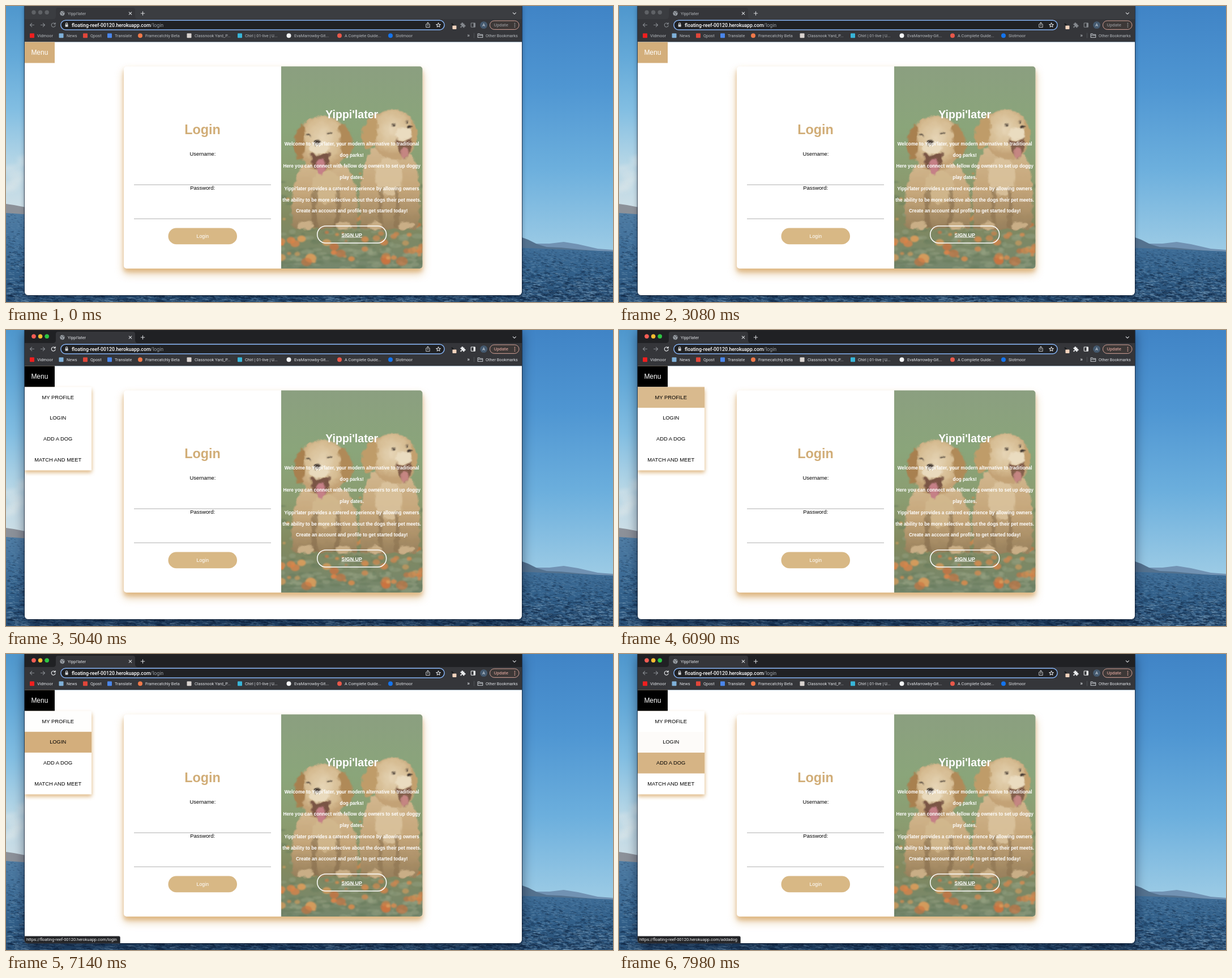
An HTML page with a canvas for the animation above (8000 ms loop, 1072x522 px).

```html
<!DOCTYPE html>
<html lang="en">
<head>
<meta charset="utf-8">
<title>Login page</title>
<style>
html, body { margin: 0; width: 100%; height: 100%; overflow: hidden; background: #4a8fcb; }
canvas, svg { position: absolute; left: 0; top: 0; width: 1072px; height: 522px; }
.shadow { position: absolute; left: 33px; top: -6px; width: 878px; height: 516px; border-radius: 7px;
  animation: shadow 8s step-end infinite; }
text { font-family: Roboto, Inter, sans-serif; }
.page text { font-family: "Liberation Sans", Arial, sans-serif; text-anchor: middle; }
.page .b { font-weight: bold; }
.ui { font-size: 7.35px; }
.line { fill: none; stroke: currentColor; stroke-width: 1.1; stroke-linecap: round; stroke-linejoin: round; }
.strip { animation: strip 8s step-end infinite; }
.icons { animation: icons 8s step-end infinite; }
.label { animation: label 8s step-end infinite; }
.update { animation: update 8s step-end infinite; }
.lights { animation: reveal-lights 8s step-end infinite; }
.menu { animation: reveal-menu 8s step-end infinite; }
.profile { animation: profile 8s infinite; }
.login { animation: login 8s infinite; }
.add { animation: add 8s infinite; }
.url1 { animation: url1 8s linear infinite; }
.url2 { animation: url2 8s step-end infinite; }

@keyframes shadow {
  0% { box-shadow: 0 4px 9px rgba(0,10,30,.36), 0 0 1px 1px rgba(20,30,45,.7); }
  56.875% { box-shadow: 0 7px 15px rgba(0,10,30,.45), 0 0 1px 1px rgba(20,30,45,.7); }
  57.75%, 100% { box-shadow: 0 9px 20px rgba(0,10,30,.52), 0 0 1px 1px rgba(20,30,45,.7); }
}
@keyframes strip { 0% { fill: #3b3d41; } 57.75%, 100% { fill: #202124; } }
@keyframes icons { 0% { color: #85898e; } 57.75%, 100% { color: #eceef0; } }
@keyframes label { 0% { fill: #b4b8bc; } 57.75%, 100% { fill: #dfe1e5; } }
@keyframes update { 0% { color: #a0a3a7; } 57.75%, 100% { color: #f0b2a8; } }
@keyframes reveal-lights { 0% { opacity: 0; } 56.875%, 100% { opacity: 1; } }
@keyframes reveal-menu { 0% { opacity: 0; } 63%, 100% { opacity: 1; } }
@keyframes profile {
  0%, 71.25% { opacity: 0; animation-timing-function: ease; }
  80%, 81.375% { opacity: 1; animation-timing-function: ease; }
  90.125%, 100% { opacity: 0; }
}
@keyframes login {
  0%, 81.375% { opacity: 0; animation-timing-function: ease; }
  90.125%, 93.125% { opacity: 1; animation-timing-function: ease; }
  100% { opacity: .04; }
}
@keyframes add {
  0%, 93.125% { opacity: 0; animation-timing-function: ease; }
  100% { opacity: .92; }
}
@keyframes url1 {
  0%, 83.1% { opacity: 0; }
  84.9%, 94.49% { opacity: 1; }
  94.5%, 100% { opacity: 0; }
}
@keyframes url2 { 0% { opacity: 0; } 94.5%, 100% { opacity: 1; } }
</style>
</head>
<body>
<canvas id="sea" width="1072" height="522"></canvas>
<div class="shadow"></div>
<svg viewBox="0 0 1072 522">
  <defs>
    <clipPath id="win"><rect x="33" y="-8" width="878" height="518" rx="6"/></clipPath>
    <clipPath id="half"><path d="M486 106.5H730.5a5 5 0 0 1 5 5V458a5 5 0 0 1-5 5H486Z"/></clipPath>
    <linearGradient id="meadow" x2="0" y2="1">
      <stop offset="0" stop-color="#8b9f80"/><stop offset=".3" stop-color="#8aa57a"/>
      <stop offset=".55" stop-color="#8b9c70"/><stop offset=".75" stop-color="#82895f"/>
      <stop offset="1" stop-color="#75876d"/>
    </linearGradient>
    <linearGradient id="fur" x2="0" y2="1">
      <stop offset="0" stop-color="#d2b78f"/><stop offset=".5" stop-color="#c5a67a"/><stop offset="1" stop-color="#98805c"/>
    </linearGradient>
    <radialGradient id="face" cy=".4">
      <stop offset="0" stop-color="#e6d5b6"/><stop offset=".7" stop-color="#d6bc92"/><stop offset="1" stop-color="#c3a276"/>
    </radialGradient>
    <filter id="soft" x="-10%" y="-10%" width="120%" height="120%"><feGaussianBlur stdDeviation="1.2"/></filter>
    <filter id="fluffy" x="-10%" y="-10%" width="120%" height="120%">
      <feGaussianBlur stdDeviation="1.3" result="blur"/>
      <feTurbulence type="fractalNoise" baseFrequency=".09" numOctaves="2" seed="4"/>
      <feDisplacementMap in="blur" scale="9" xChannelSelector="R" yChannelSelector="G"/>
    </filter>
    <filter id="glow1" x="-20%" y="-20%" width="140%" height="140%"><feGaussianBlur stdDeviation="8"/></filter>
    <filter id="glow2" x="-20%" y="-20%" width="140%" height="140%"><feGaussianBlur stdDeviation="3.5"/></filter>
  </defs>

  <g clip-path="url(#win)">
    <rect x="33" y="-8" width="878" height="40" class="strip"/>
    <path d="M83 23q5 0 5-5V7q0-4 4-4H224q4 0 4 4V18q0 5 5 5H911V63.5H33V23Z" fill="#35363a"/>
    <rect x="33" y="63.5" width="878" height="447" fill="#fff"/>
  </g>

  <g fill="#5f6266"><circle cx="49" cy="11.3" r="3.7"/><circle cx="60.6" cy="11.3" r="3.7"/><circle cx="72.2" cy="11.3" r="3.7"/></g>
  <g class="lights">
    <circle cx="49" cy="11.3" r="3.7" fill="#fb5b52"/><circle cx="60.6" cy="11.3" r="3.7" fill="#fdbc2e"/><circle cx="72.2" cy="11.3" r="3.7" fill="#2bc840"/>
  </g>

  <g class="ui">
    <circle cx="99.5" cy="13" r="4.2" fill="#9aa0a6"/>
    <path d="M96.5 11.5l2.5 1 1 2-1.5 2M100 9.3l1 2 2 .5" fill="none" stroke="#45474b" stroke-width="1"/>
    <text x="109" y="15.6" class="label">Yippi'later</text>
    <g class="line" color="#d5d7da"><path d="M217.3 10.8l4.4 4.4m0-4.4l-4.4 4.4M238.3 13h6.4M241.5 9.8v6.4M895.3 11.8l2.6 2.6 2.6-2.6"/></g>

    <rect x="96.8" y="25.3" width="677.4" height="16.6" rx="8.3" fill="#202124" stroke="#85b2f2" stroke-width="1.5"/>
    <rect x="104.6" y="32.4" width="5" height="4.3" rx=".6" fill="#d0d3d6"/>
    <path d="M105.6 32.5v-1.3a1.5 1.5 0 0 1 3 0v1.3" class="line" color="#d0d3d6" stroke-width=".9"/>
    <text x="116" y="36.7" font-size="8.75" font-weight="500" fill="#fff">floating-reef-00120.herokuapp.com<tspan font-weight="400" fill="#9aa0a6">/login</tspan></text>
    <g class="line" color="#d5d7da">
      <path d="M743.2 32h-1.4v5.6h6.4V32h-1.4M745 35v-6m-1.8 1.7l1.8-1.8 1.8 1.8" stroke-width=".9"/>
      <path id="star" d=""/>
    </g>
    <g class="line" color="#84888d"><path d="M49.5 33.5h-7m3.2-3.2l-3.2 3.2 3.2 3.2M61.5 33.5h7m-3.2-3.2l3.2 3.2-3.2 3.2"/></g>
    <g class="icons">
      <path d="M86.4 31.3a3.5 3.5 0 1 0 .7 3.2M87.2 29.6v2.3h-2.4" class="line"/>
      <path d="M802.5 31.3h2a1.5 1.5 0 1 1 2.8 0h2.2v2.3a1.5 1.5 0 1 1 0 2.7v1.9h-2.4a1.4 1.4 0 1 0-2.5 0h-2.1v-2.3a1.4 1.4 0 1 0 0-2.5Z" fill="currentColor"/>
      <rect x="821.3" y="30" width="7.2" height="7.2" rx=".7" class="line"/>
      <rect x="825.6" y="30" width="2.9" height="7.2" fill="currentColor"/>
    </g>
    <path d="M787 31l4 4" stroke="#17181a" stroke-width="2.2"/>
    <rect x="788.5" y="34.5" width="7" height="6.5" rx="1" fill="#f3d3bd"/>
    <circle cx="843.7" cy="33.6" r="6.4" fill="#455a70"/>
    <text x="843.7" y="36.2" text-anchor="middle" fill="#e6ebf0">A</text>
    <g class="update">
      <rect x="854.5" y="26" width="51.5" height="15.4" rx="7.7" fill="#3d3837" stroke="#d3a196"/>
      <text x="861.8" y="36.3" font-size="7.9" fill="currentColor">Update</text>
      <g fill="currentColor"><circle cx="898.5" cy="30.6" r=".9"/><circle cx="898.5" cy="33.7" r=".9"/><circle cx="898.5" cy="36.8" r=".9"/></g>
    </g>

    <g id="marks"></g>
    <text x="814.5" y="54.6" font-size="9" font-weight="bold" class="label">»</text>
    <path d="M826.7 47.5v9" stroke="#5f6368" stroke-width=".7"/>
    <path d="M833.2 55.5v-6.4h3l1 1.2h4.6v5.2ZM833.2 52h8.6" class="line" color="#bdc1c6"/>
    <text x="847" y="54.7" class="label">Other Bookmarks</text>
  </g>

  <g class="page">
    <rect x="33" y="63.5" width="53" height="37" fill="#d3ae7b"/>
    <text x="59.4" y="86" font-size="12" fill="#fff">Menu</text>

    <rect x="208" y="115" width="527.5" height="357" rx="5" fill="#d9b27c" opacity=".65" filter="url(#glow1)"/>
    <rect x="208" y="112" width="527.5" height="357" rx="5" fill="#d9a766" opacity=".6" filter="url(#glow2)"/>
    <rect x="208" y="106.5" width="527.5" height="356.5" rx="5" fill="#fff"/>
    <text class="b" x="347" y="225.5" font-size="23.4" fill="#d1ad77">Login</text>
    <text x="347.4" y="264" font-size="9.4">Username:</text>
    <text x="347.2" y="324" font-size="9.4">Password:</text>
    <path d="M226 315.2H468M226 375.2H468" stroke="#b0b0b0" stroke-width="1.1"/>
    <rect x="286.5" y="391.5" width="121.5" height="28.8" rx="14.4" fill="#d8b885"/>
    <text x="347.3" y="409" font-size="8.8" fill="#fff">Login</text>

    <g clip-path="url(#half)">
      <rect x="486" y="106" width="250" height="358" fill="url(#meadow)"/>
      <g id="flowers" filter="url(#soft)"></g>
      <g filter="url(#fluffy)">
        <!-- right puppy -->
        <path d="M626 394Q618 300 645 252Q700 238 722 270Q738 335 727 394Z" fill="url(#fur)"/>
        <ellipse cx="676" cy="300" rx="24" ry="34" fill="#dcc6a0" opacity=".8"/>
        <path d="M640 205Q652 182 686 183Q716 186 723 212Q728 236 714 262Q690 278 662 262Q640 240 640 205Z" fill="url(#face)"/>
        <path d="M648 194Q628 208 629 236Q633 254 644 252Q658 230 656 202Z" fill="#bf9c69"/>
        <path d="M717 202Q728 218 725 244Q720 252 715 240Z" fill="#c3a06e"/>
        <path d="M688 234Q704 242 716 232Q718 258 706 270Q692 266 688 234Z" fill="#835e4c"/>
        <ellipse cx="704" cy="259" rx="7" ry="10" fill="#c58682"/>
        <ellipse cx="703" cy="226" rx="15" ry="10" fill="#eadcc0"/>
        <ellipse cx="712" cy="214" rx="5" ry="3.6" fill="#4c4039"/>
        <circle cx="685" cy="210" r="2.8" fill="#4c4039"/><circle cx="708" cy="203" r="2.2" fill="#4c4039"/>
        <path d="M664 320Q658 356 664 392M690 320Q694 356 688 392" fill="none" stroke="#8a7250" stroke-width="7" opacity=".6"/>
        <!-- left puppy -->
        <path d="M506 392Q498 322 524 280Q565 262 604 284Q628 335 619 392Z" fill="url(#fur)"/>
        <ellipse cx="566" cy="318" rx="26" ry="30" fill="#d3b98f" opacity=".8"/>
        <path d="M515 232Q520 196 558 194Q596 196 604 228Q606 262 584 284Q560 300 534 284Q516 264 515 232Z" fill="url(#face)"/>
        <path d="M524 208Q506 222 509 256Q514 276 524 270Q530 240 528 212Z" fill="#a8804f"/>
        <path d="M594 206Q614 220 612 250Q608 268 596 268Q588 238 588 212Z" fill="#b08a58"/>
        <path d="M538 258Q554 266 572 258Q572 286 556 298Q540 288 538 258Z" fill="#7a5545"/>
        <ellipse cx="556" cy="284" rx="9" ry="14" fill="#c58087"/>
        <ellipse cx="553" cy="249" rx="18" ry="11" fill="#e9dabd"/>
        <ellipse cx="549" cy="241" rx="6" ry="4.2" fill="#4c4039"/>
        <path d="M532 228q4-3 8 0M567 225q4-3 9 1" fill="none" stroke="#4c4039" stroke-width="3"/>
        <path d="M546 322Q540 358 548 392M586 322Q590 358 582 392" fill="none" stroke="#846c4b" stroke-width="8" opacity=".6"/>
        <g fill="#c9ae86"><ellipse cx="530" cy="387" rx="14" ry="7"/><ellipse cx="596" cy="388" rx="14" ry="7"/><ellipse cx="652" cy="387" rx="13" ry="7"/><ellipse cx="706" cy="387" rx="14" ry="7"/></g>
      </g>
    </g>
    <g fill="#fff" class="b">
      <text x="610.7" y="197.5" font-size="19.5">Yippi'later</text>
      <g id="intro" font-size="8.26"></g>
      <text x="610.7" y="406.5" font-size="8.85" text-decoration="underline">SIGN UP</text>
    </g>
    <rect x="549.7" y="388" width="122" height="30" rx="15" fill="none" stroke="#fff" stroke-width="1.5"/>

    <g class="menu">
      <g clip-path="url(#win)">
        <rect x="33" y="107" width="118" height="144" fill="#d9b27c" opacity=".55" filter="url(#glow2)"/>
        <rect x="33" y="104" width="118" height="147" fill="#d9a766" opacity=".55" filter="url(#glow2)"/>
      </g>
      <rect x="33" y="63.5" width="53" height="37" fill="#000"/>
      <text x="59.4" y="86" font-size="12" fill="#fff">Menu</text>
      <rect x="33" y="100.5" width="118" height="147" fill="#fff"/>
      <g fill="#d3ae7b">
        <rect class="profile" x="33" y="100.5" width="118" height="36.7"/>
        <rect class="login" x="33" y="137.2" width="118" height="36.7"/>
        <rect class="add" x="33" y="173.9" width="118" height="36.7"/>
      </g>
      <g font-size="9.35">
        <text x="91.7" y="121.7">MY PROFILE</text>
        <text x="91.7" y="158.2">LOGIN</text>
        <text x="91.7" y="195">ADD A DOG</text>
        <text x="91.7" y="231.6">MATCH AND MEET</text>
      </g>
    </g>
  </g>

  <g font-size="7.45" fill="#eceef0">
    <g class="url1">
      <path d="M33 497.8H199.5q2 0 2 2V510H38q-5 0-5-5Z" fill="#222326" stroke="#55575b" stroke-width=".6"/>
      <text x="36" y="506.4">https://floating-reef-00120.herokuapp.com/login</text>
    </g>
    <g class="url2">
      <path d="M33 497.8H212.5q2 0 2 2V510H38q-5 0-5-5Z" fill="#222326" stroke="#55575b" stroke-width=".6"/>
      <text x="36" y="506.4">https://floating-reef-00120.herokuapp.com/addadog</text>
    </g>
  </g>
</svg>

<script>
const $ = id => document.getElementById(id);

let seed = 7;
const rand = () => (seed = (seed * 16807) % 2147483647) / 2147483647;

function add(parent, tag, attrs, text) {
  const el = document.createElementNS("http://www.w3.org/2000/svg", tag);
  for (const k in attrs) el.setAttribute(k, attrs[k]);
  if (text) el.textContent = text;
  parent.appendChild(el);
}

// Bookmark bar: icon x, text x, colour, round icon, label
[
  [46, 55, "#f01f1f", 0, "Vidmoor"],
  [97.5, 107, "#7fb0d8", 0, "News"],
  [140, 149, "#e0463a", 0, "Qpost"],
  [183, 192, "#4a86ea", 0, "Translate"],
  [237, 246, "#f0794a", 1, "Framecatchly Beta"],
  [323.5, 333, "#d9d3d0", 0, "Classnook Yard_P..."],
  [413, 422, "#38b5d8", 0, "Chirl | 01-live | U..."],
  [499.5, 509, "#f4f5f6", 1, "EvaMarrowby-Git..."],
  [589, 598, "#e8584a", 1, "A Complete Guide..."],
  [679, 688, "#1474ee", 1, "Slotmoor"]
].forEach(([ix, tx, fill, round, label]) => {
  add($("marks"), "rect", { x: ix - 4, y: 48.2, width: 8, height: 8, rx: round ? 4 : 1, fill });
  add($("marks"), "text", { x: tx, y: 54.7, class: "label" }, label);
});

[
  "Welcome to Yippi'later, your modern alternative to traditional",
  "dog parks!",
  "Here you can connect with fellow dog owners to set up doggy",
  "play dates.",
  "Yippi'later provides a catered experience by allowing owners",
  "the ability to be more selective about the dogs their pet meets.",
  "Create an account and profile to get started today!"
].forEach((line, i) => add($("intro"), "text", { x: 610.7, y: 245.8 + i * 19.75 }, line));

let star = "";
for (let i = 0; i < 10; i++) {
  const r = i % 2 ? 1.8 : 4, a = i * Math.PI / 5;
  star += (i ? "L" : "M") + (763.6 + r * Math.sin(a)).toFixed(2) + " " + (33.8 - r * Math.cos(a)).toFixed(2);
}
$("star").setAttribute("d", star + "Z");

// Grass tufts, then blossoms that grow towards the viewer
const petals = ["#d58b50", "#d79c5c", "#cd7340", "#dc8348"];
for (let i = 0; i < 190; i++) {
  const k = Math.sqrt(rand());
  add($("flowers"), "ellipse", {
    cx: 486 + rand() * 250, cy: 300 + 164 * k, rx: 3 + 9 * rand(), ry: 1.5 + 3 * rand(),
    fill: rand() < .5 ? "#647a5c" : "#97a183", opacity: .45
  });
}
for (let i = 0; i < 90; i++) {
  const k = Math.pow(rand(), .7), size = 1.5 + 7 * k * rand();
  add($("flowers"), "ellipse", {
    cx: 486 + rand() * 250, cy: 285 + 172 * k, rx: size * 1.3, ry: size,
    fill: petals[i % 4], opacity: .55 + .4 * rand()
  });
}

// Wallpaper: sky, clouds, hills and a slightly tilted sea
const c = $("sea").getContext("2d");
const horizon = x => 365 + Math.min(.068 * x, 25 + .04 * x);

function fade(y0, y1, ...stops) {
  const g = c.createLinearGradient(0, y0, 0, y1);
  stops.forEach((s, i) => g.addColorStop(i / (stops.length - 1), s));
  return g;
}
function shape(fill, ...pts) {
  c.fillStyle = fill;
  c.beginPath();
  for (let i = 0; i < pts.length; i += 2) c.lineTo(pts[i], pts[i + 1]);
  c.fill();
}

c.fillStyle = fade(0, 430, "#4084c6", "#4f96d2", "#6cafdd", "#9ccbe5");
c.fillRect(0, 0, 1072, 522);
c.fillStyle = fade(0, 365, "#4f97cd", "#64a9d8", "#82bee2", "#b3d5e6", "#cfdfe6");
c.fillRect(0, 0, 60, 370);
c.filter = "blur(4px)";
c.fillStyle = "rgba(238,239,236,.6)";
for (let i = 0; i < 7; i++) {
  c.beginPath();
  c.ellipse(rand() * 36, 268 + i * 9, 16, 3, -.2, 0, 7);
  c.fill();
}
c.filter = "none";

shape("#8c9199", 0, 349, 14, 351, 40, 356, 40, 370, 0, 368);
shape("#7192b3", 911, 409, 935, 419, 960, 419, 985, 416, 1010, 420, 1045, 428, 1072, 430, 1072, 436, 911, 430);
shape("#54728f", 911, 408, 922, 412, 938, 420, 955, 425, 980, 426, 1010, 429, 1045, 432, 1072, 433, 1072, 436, 911, 430);
shape(fade(365, 522, "#4f7ca3", "#41709a", "#32608a", "#294f75"),
  0, horizon(0), 900, horizon(900), 1072, horizon(1072), 1072, 522, 0, 522);

for (let i = 0; i < 9000; i++) {
  const x = rand() * 1072, h = horizon(x), d = rand(), y = h + 1 + (522 - h) * d;
  const len = 3 + 11 * d * rand();
  c.strokeStyle = rand() < .55 ? "rgba(16,38,66,.45)" : "rgba(120,158,188,.4)";
  c.lineWidth = .5 + 1.2 * d;
  c.beginPath();
  c.moveTo(x, y);
  c.quadraticCurveTo(x + len / 2, y - 1.6 * d, x + len, y + .6);
  c.stroke();
}
</script>
</body>
</html>
```
